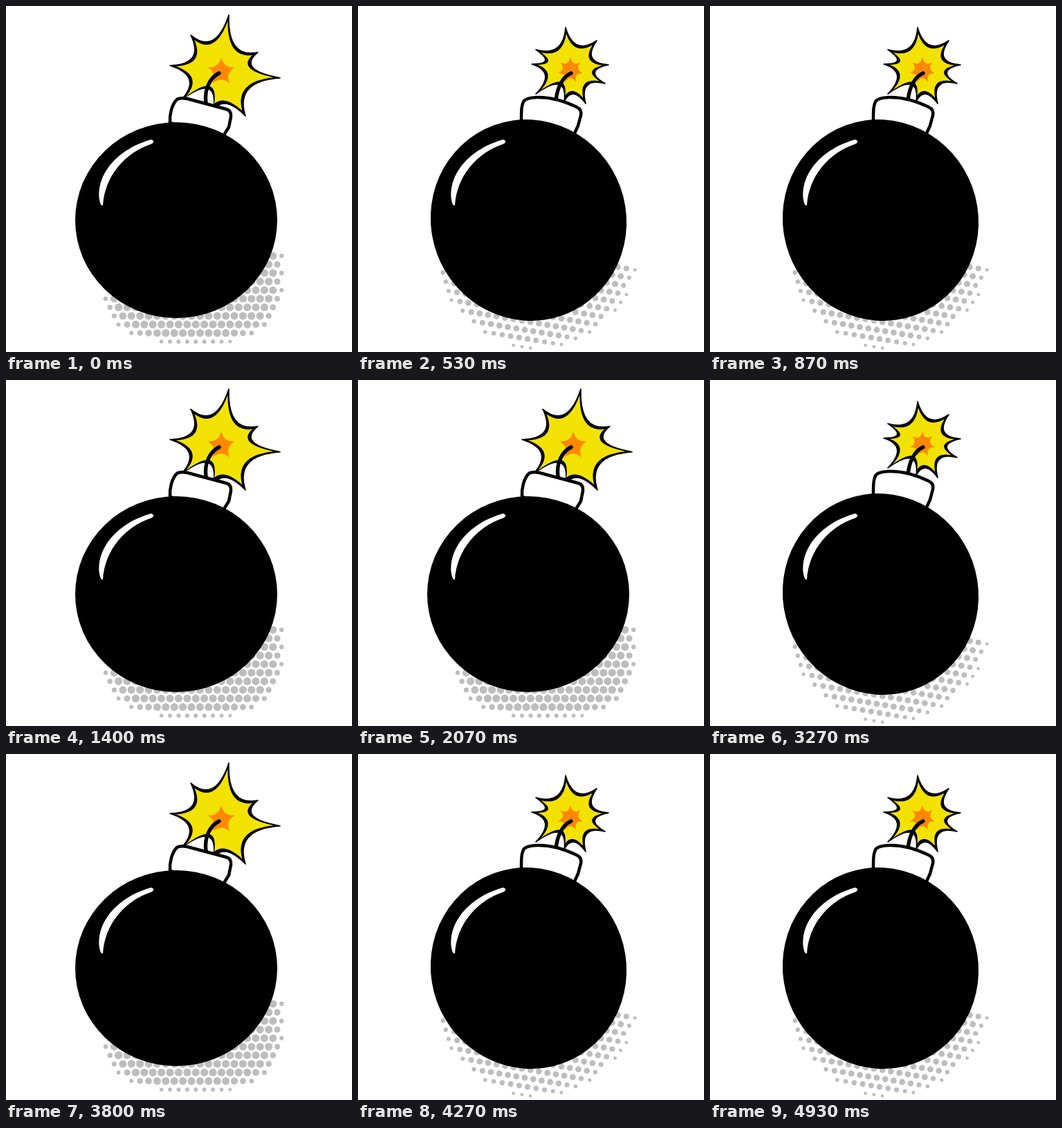
An HTML page that plays this animation: 500x500 px, repeating every 5.13 s.

```html
<!DOCTYPE html>
<html lang="en">
<head>
<meta charset="utf-8">
<title>Bomb</title>
<style>
html, body { margin: 0; width: 100%; height: 100%; overflow: hidden; background: #fff; }
svg { display: block; width: 100%; height: 100%; }
</style>
</head>
<body>
<svg id="stage" viewBox="0 0 500 500"></svg>
<script>
const LOOP = 5130;
const YELLOW = '#f3e200', ORANGE = '#ff8800', GREY = '#bdbdbd';

// Swaps fall on a 15 per second clock, a little over 2.5 ticks apart.
const swapTime = n => Math.round(Math.floor(2.554 * n + 0.93) / 1.5) * 10 + roundFix(n);
function roundFix(n) {
  const ticks = Math.floor(2.554 * n + 0.93);
  return Math.round(ticks * 100 / 15) * 10 - Math.round(ticks / 1.5) * 10;
}

// Flame tips are x, y and, where needed, how deep the valley after the tip is.
const poses = [
  {
    ball: { x: 246, y: 309.5, rx: 146, ry: 141.5, turn: 0 },
    hub: [307, 96],
    tips: [[322, 13], [364, 67], [396, 104], [346, 159, 0.45], [300, 150, 1], [253, 136], [237, 86], [267, 42]],
    star: { x: 311, y: 95, r: 21, count: 5 },
    fuse: 'M289 141C286 118 296 103 308 97',
    cap: 'M237 169C236 156 240 143 246 136Q250 132 262 134L318 149Q326 151 325 160L322 175L314 188Z',
    dots: { hub: [270, 380], size: [133, 108], power: 3, top: 357, origin: [144, 423], tilt: 0, max: 5.6 }
  },
  {
    ball: { x: 246.5, y: 309.5, rx: 141, ry: 146, turn: -20 },
    hub: [306, 90],
    tips: [[300, 31], [345, 50], [362, 85], [357, 112], [329, 141, 0.5], [298, 138, 0.9], [257, 127], [251, 84], [257, 63]],
    star: { x: 307, y: 93, r: 19, count: 7 },
    fuse: 'M286 139C287 118 296 102 308 97',
    cap: 'M236 166C236 152 236 143 240 137Q243 133 258 132Q285 131 316 146Q324 150 322 158L318 173L312 186Z',
    dots: { hub: [258, 348], size: [147, 147], power: 2, top: 374, origin: [135, 425], tilt: 9.5, max: 4.4 }
  }
];

const mix = (a, b, k) => [a[0] + (b[0] - a[0]) * k, a[1] + (b[1] - a[1]) * k];
const dist = (a, b) => Math.hypot(a[0] - b[0], a[1] - b[1]);

// Concave spikes; inset shortens the tips, which thins the rim towards them.
function spikes(tips, hub, depth, inset = 0) {
  const ends = tips.map(t => mix(t, hub, inset / dist(t, hub)));
  return 'M' + ends[0] + tips.map((t, i) => {
    const j = (i + 1) % tips.length;
    const valley = mix(mix(t, tips[j], 0.5), hub, t[2] ?? depth);
    return `Q${valley} ${ends[j]}`;
  }).join('') + 'Z';
}

function starPath({ x, y, r, count }) {
  const tips = Array.from({ length: count }, (_, i) => {
    const a = i / count * 2 * Math.PI - Math.PI / 2;
    return [x + r * Math.cos(a), y + r * Math.sin(a)];
  });
  return spikes(tips, [x, y], 0.65);
}

// Staggered halftone whose dots shrink towards the rim of the shadow.
function halftone({ hub, size, power, top, origin, tilt, max }) {
  const pitch = 12.4, a = tilt * Math.PI / 180;
  const cos = Math.cos(a), sin = Math.sin(a);
  let d = '';
  for (let row = -14; row <= 14; row++) {
    for (let col = -8; col <= 28; col++) {
      const u = (col + (row & 1) / 2) * pitch, v = row * pitch;
      const x = origin[0] + u * cos - v * sin;
      const y = origin[1] + u * sin + v * cos;
      const rim = 1 - Math.abs((x - hub[0]) / size[0]) ** power - Math.abs((y - hub[1]) / size[1]) ** power;
      if (rim < 0 || y < top) continue;
      const r = Math.min(max, 2.3 + rim * 10);
      d += `M${x - r} ${y}a${r} ${r} 0 1 0 ${2 * r} 0a${r} ${r} 0 1 0 ${-2 * r} 0`;
    }
  }
  return d;
}

function draw({ ball, hub, tips, star, fuse, cap, dots }) {
  return `<g>
    <path d="${halftone(dots)}" fill="${GREY}"/>
    <path d="${spikes(tips, hub, 0.64)}" stroke="#000" stroke-width="1.6" stroke-linejoin="round"/>
    <path d="${spikes(tips, hub, 0.64, 9)}" fill="${YELLOW}"/>
    <path d="${starPath(star)}" fill="${ORANGE}"/>
    <path d="${fuse}" fill="none" stroke="#000" stroke-width="5.4" stroke-linecap="round"/>
    <path d="${cap}" fill="#fff" stroke="#000" stroke-width="4.5" stroke-linejoin="round"/>
    <ellipse cx="${ball.x}" cy="${ball.y}" rx="${ball.rx}" ry="${ball.ry}" transform="rotate(${ball.turn} ${ball.x} ${ball.y})"/>
    <path d="M210 193C168 204 130 238 135 280Q137 290 140 288C143 245 172 212 211 199Q216 195 210 193Z" fill="#fff"/>
  </g>`;
}

const stage = document.getElementById('stage');
stage.innerHTML = poses.map(draw).join('');
const groups = [...stage.children];

function show(t) {
  let swaps = 0;
  while (swapTime(swaps + 1) <= t) swaps++;
  groups.forEach((g, i) => g.setAttribute('display', i === swaps % 2 ? 'inline' : 'none'));
}

const start = performance.now();
function tick() {
  show((performance.now() - start) % LOOP);
  requestAnimationFrame(tick);
}
tick();
</script>
</body>
</html>
```
